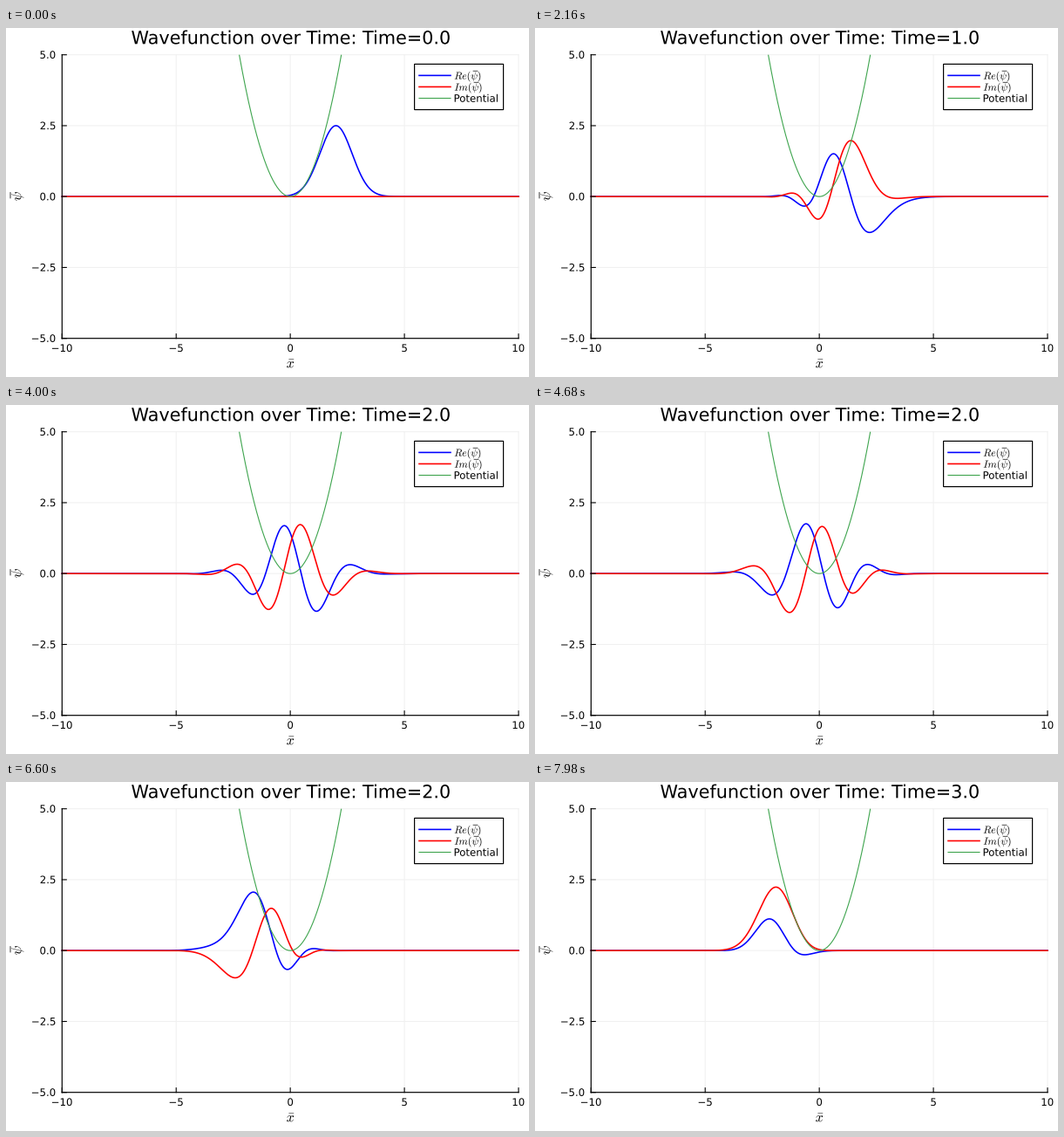
These frames come from a looping animation (600x400 px, 8000 ms). A matplotlib script:

```python
import numpy as np
import matplotlib.pyplot as plt
from matplotlib.animation import FuncAnimation
from matplotlib.patches import PathPatch, Rectangle
from matplotlib.textpath import TextPath
from matplotlib.transforms import Affine2D

W, H, DPI = 600, 400, 100
PX = 72 / DPI                     # points per pixel
FRAMES, INTERVAL, DT = 400, 20, 0.0075
LEFT, RIGHT, TOP, BOTTOM = 64.3, 588.0, 30.7, 355.7
BLUE, RED, GREEN, GRID = "#0000ff", "#ff0000", "#3da44d", "#f0f0f0"
TICK, NAME, TITLE = 11.75, 16, 20.75      # text sizes in pixels

plt.rcParams["font.family"] = "DejaVu Sans"
plt.rcParams["mathtext.fontset"] = "cm"

fig = plt.figure(figsize=(W / DPI, H / DPI), dpi=DPI, facecolor="white")
ax = fig.add_axes([0, 0, 1, 1])
ax.set_xlim(0, W)
ax.set_ylim(H, 0)
ax.axis("off")


def px(x):
    return LEFT + (x + 10) * (RIGHT - LEFT) / 20


def py(y):
    return BOTTOM - (y + 5) * (BOTTOM - TOP) / 10


def line(xs, ys, color, width, z, **kw):
    return ax.plot(xs, ys, color=color, lw=width * PX, zorder=z,
                   snap=False, **kw)[0]


def text_path(x, y, s, size, align=0.5, angle=0):
    """Unhinted text on baseline y; align is 0 left, 0.5 centre, 1 right."""
    path = TextPath((0, 0), s, size=size)
    box = path.get_extents()
    shift = box.x0 + align * box.width
    move = Affine2D().translate(-shift, 0).rotate_deg(angle)
    return move.scale(1, -1).translate(x, y).transform_path(path)


def label(*args, **kw):
    patch = PathPatch(text_path(*args, **kw), fc="black", lw=0, zorder=9)
    return ax.add_patch(patch)


def wave(x, t):
    """Displaced Gaussian 2.5 exp(-(x-2)^2) in a unit harmonic well."""
    c, s = np.cos(t), np.sin(t)
    spread = c + 2j * s
    a = (2 * c + 1j * s) / spread
    u = x - 2 * c
    psi = 2.5 / np.sqrt(spread) * np.exp(
        -a * u**2 / 2 - 2j * s * u - 1j * np.sin(2 * t))
    return psi.conj()


# Grid, ticks and axes
for v in (-10, -5, 0, 5, 10):
    if v > -10:
        line([px(v)] * 2, [TOP, BOTTOM], GRID, 1, 1)
    line([px(v)] * 2, [BOTTOM - 5, BOTTOM], "black", 1.1, 6)
    label(px(v), 371, str(v).replace("-", "\u2212"), TICK)
for v in (-5, -2.5, 0, 2.5, 5):
    if v > -5:
        line([LEFT, RIGHT], [py(v)] * 2, GRID, 1, 1)
    line([LEFT, LEFT + 5], [py(v)] * 2, "black", 1.1, 6)
    label(56.4, py(v) + 4.2, f"{v:.1f}".replace("-", "\u2212"), TICK, 1)
line([LEFT, LEFT], [TOP, BOTTOM], "black", 1.2, 6)
line([LEFT, RIGHT], [BOTTOM, BOTTOM], "black", 1.2, 6)

label(326.2, 389.3, r"$\bar{x}$", NAME)
label(17.3, 193, r"$\psi$", NAME, angle=90)
line([5, 5], [188.5, 195], "black", 0.8, 9)
title = label(326.5, 18.3, "Wavefunction over Time: Time=0.0", TITLE)

# Legend
ax.add_patch(Rectangle((468.6, 41.4), 102, 52.2, fc="white", ec="black",
                       lw=1.2 * PX, zorder=7, snap=False))
rows = ((r"$Re(\psi)$", BLUE, 1.6), (r"$Im(\psi)$", RED, 1.6),
        ("Potential", GREEN, 1.1))
for i, (name, color, width) in enumerate(rows):
    y = 54.4 + 13.05 * i
    line([474, 510], [y, y], color, width, 8)
    label(514.7, y + 4.2, name, TICK, 0)
    if "psi" in name:
        line([536 + i, 541 + i], [y - 5.2] * 2, "black", 0.7, 9)

# Curves
x = np.linspace(-10, 10, 1201)
re_line = line(px(x), px(x), BLUE, 1.6, 3)
im_line = line(px(x), px(x), RED, 1.6, 3.1)
xv = np.linspace(-np.sqrt(5), np.sqrt(5), 201)
line(px(xv), py(xv**2), GREEN, 1.1, 4, solid_capstyle="butt")


def update(i):
    t = i * DT
    psi = wave(x, t)
    re_line.set_ydata(py(psi.real))
    im_line.set_ydata(py(psi.imag))
    text = f"Wavefunction over Time: Time={round(t):.1f}"
    title.set_path(text_path(326.5, 18.3, text, TITLE))
    return re_line, im_line, title


anim = FuncAnimation(fig, update, frames=FRAMES, interval=INTERVAL,
                     repeat=True, repeat_delay=0, blit=False)
plt.show()
```
